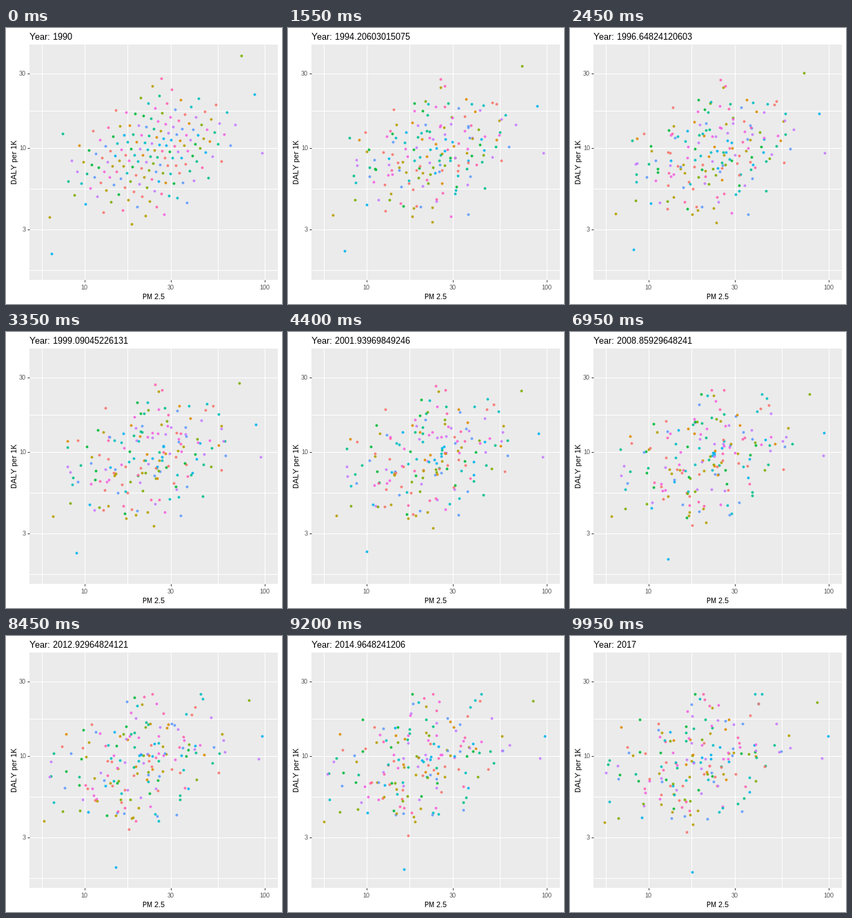
A matplotlib script for the animation above (10000 ms loop, 400 px wide and 400 px high).

```python
import matplotlib.pyplot as plt
import numpy as np
from matplotlib.animation import FuncAnimation
from matplotlib.patches import Rectangle

plt.rcParams.update({
    "font.family": "Liberation Sans",
    "text.hinting": "native",
    "text.hinting_factor": 1,
})

SIZE = 400
FRAMES = 200
PX = 0.72  # points per pixel at 100 dpi
FIRST, LAST = 1990, 2017
LEFT, TOP, RIGHT, BOTTOM = 34, 24, 394, 365
CLOUD = 178
GOLDEN = (5 ** 0.5 - 1) / 2

PALETTE = np.array([
    "#F8766D", "#DE8C00", "#B79F00", "#7CAE00", "#00BA38", "#00C08B",
    "#00BFC4", "#00B4F0", "#619CFF", "#C77CFF", "#F564E3", "#FF64B0",
])

# Dots far from the cloud: palette index, then start, middle and end in pixels
OUTLIERS = [
    (3, (341, 40), (338, 85), (358, 96)),
    (7, (360, 96), (363, 147), (374, 145)),
    (9, (371, 181), (369, 181), (365, 177)),
    (7, (66, 327), (114, 318), (177, 342)),
    (2, (63, 274), (70, 266), (50, 270)),
    (11, (225, 73), (214, 78), (195, 92)),
]

# Years between which every dot of the cloud moves in a straight line
YEARS = np.array([1990, 1995, 2000, 2005, *range(2010, LAST + 1)])


def blend(keys, poses):
    """Linear in-betweens for poses of shape (keys, dots, 2), for all frames."""
    steps = np.arange(FRAMES)
    flat = poses.reshape(len(keys), -1)
    columns = [np.interp(steps, keys, col) for col in flat.T]
    return np.array(columns).T.reshape(FRAMES, -1, 2)


def triangular(u, low, mode, high):
    """Inverse distribution: spreads even u in 0..1 around the mode."""
    cut = (mode - low) / (high - low)
    rise = low + np.sqrt(u * (high - low) * (mode - low))
    fall = high - np.sqrt((1 - u) * (high - low) * (high - mode))
    return np.where(u < cut, rise, fall)


def cloud_poses(rng):
    """Evenly filled, correlated cloud that wanders and slides to the left."""
    i = np.arange(CLOUD)
    u, v = (i + 0.5) / CLOUD, (i * GOLDEN) % 1
    x = triangular(u, 72, 218, 342)
    reach = 60 + 50 * np.sin(np.pi * u)
    y = 237 - 0.275 * x + reach * triangular(v, -1, 0, 1.1)
    poses = [np.stack([x, y], axis=1)]
    for gap in np.diff(YEARS):
        sd = (7, 8) if gap > 1 else (4, 4)
        poses.append(poses[-1] + rng.normal(0, sd, (CLOUD, 2)))
    poses = np.array(poses)
    age = (YEARS - FIRST) / (LAST - FIRST)
    poses[:, :, 0] -= 28 * age[:, None] ** 2
    return np.clip(poses, (52, 84), (350, 318))


rng = np.random.default_rng(27)
year_frames = (YEARS - FIRST) * (FRAMES - 1) / (LAST - FIRST)
cloud = blend(year_frames, cloud_poses(rng))
routes = np.array([stops for _, *stops in OUTLIERS], dtype=float)
strays = blend([0, 88, FRAMES - 1], routes.transpose(1, 0, 2))
path = np.floor(np.concatenate([cloud, strays], axis=1)) + 0.5
hues = [*rng.integers(0, len(PALETTE), CLOUD), *(o[0] for o in OUTLIERS)]

fig = plt.figure(figsize=(4, 4), dpi=100, facecolor="white")
ax = fig.add_axes([0, 0, 1, 1])
ax.set_xlim(0, SIZE)
ax.set_ylim(SIZE, 0)
ax.axis("off")


def line(xs, ys, color):
    ax.plot(xs, ys, color=color, lw=PX, solid_capstyle="butt", zorder=1)


def label(x, y, text, px, color="black", **kw):
    kw = {"ha": "center", "va": "baseline", **kw}
    return ax.text(x, y, text, fontsize=px * PX, color=color, **kw)


ax.add_patch(Rectangle((LEFT, TOP), RIGHT - LEFT, BOTTOM - TOP,
                       fc="#EBEBEB", lw=0, zorder=0))

x_ticks = {113.5: "10", 238.5: "30", 374.5: "100"}
y_ticks = {65.5: "30", 173.5: "10", 291.5: "3"}

for x in [51.5, 175.5, 306.5, *x_ticks]:
    line([x, x], [TOP, BOTTOM], "white")
for y in [119.5, 232.5, 350.5, *y_ticks]:
    line([LEFT, RIGHT], [y, y], "white")

for x, text in x_ticks.items():
    line([x, x], [BOTTOM, BOTTOM + 3], "#333333")
    label(x, 379, text, 9, "#4D4D4D")
for y, text in y_ticks.items():
    line([LEFT - 3, LEFT], [y, y], "#333333")
    label(29, y + 3.5, text, 9, "#4D4D4D", ha="right")

label(214, 393, "PM 2.5", 11)
label(13, 194.5, "DALY per 1K", 11, rotation=90, va="center")
title = label(LEFT, 17, "", 13, ha="left")

dots = ax.scatter(path[0, :, 0], path[0, :, 1], s=(3.9 * PX) ** 2,
                  c=PALETTE[hues], alpha=0.9, linewidths=0, zorder=2)


def draw(i):
    year = FIRST + (LAST - FIRST) * i / (FRAMES - 1)
    title.set_text(f"Year: {year:.15g}")
    dots.set_offsets(path[i])
    return title, dots


anim = FuncAnimation(fig, draw, frames=FRAMES, interval=50,
                     repeat=True, repeat_delay=0)
plt.show()
```
